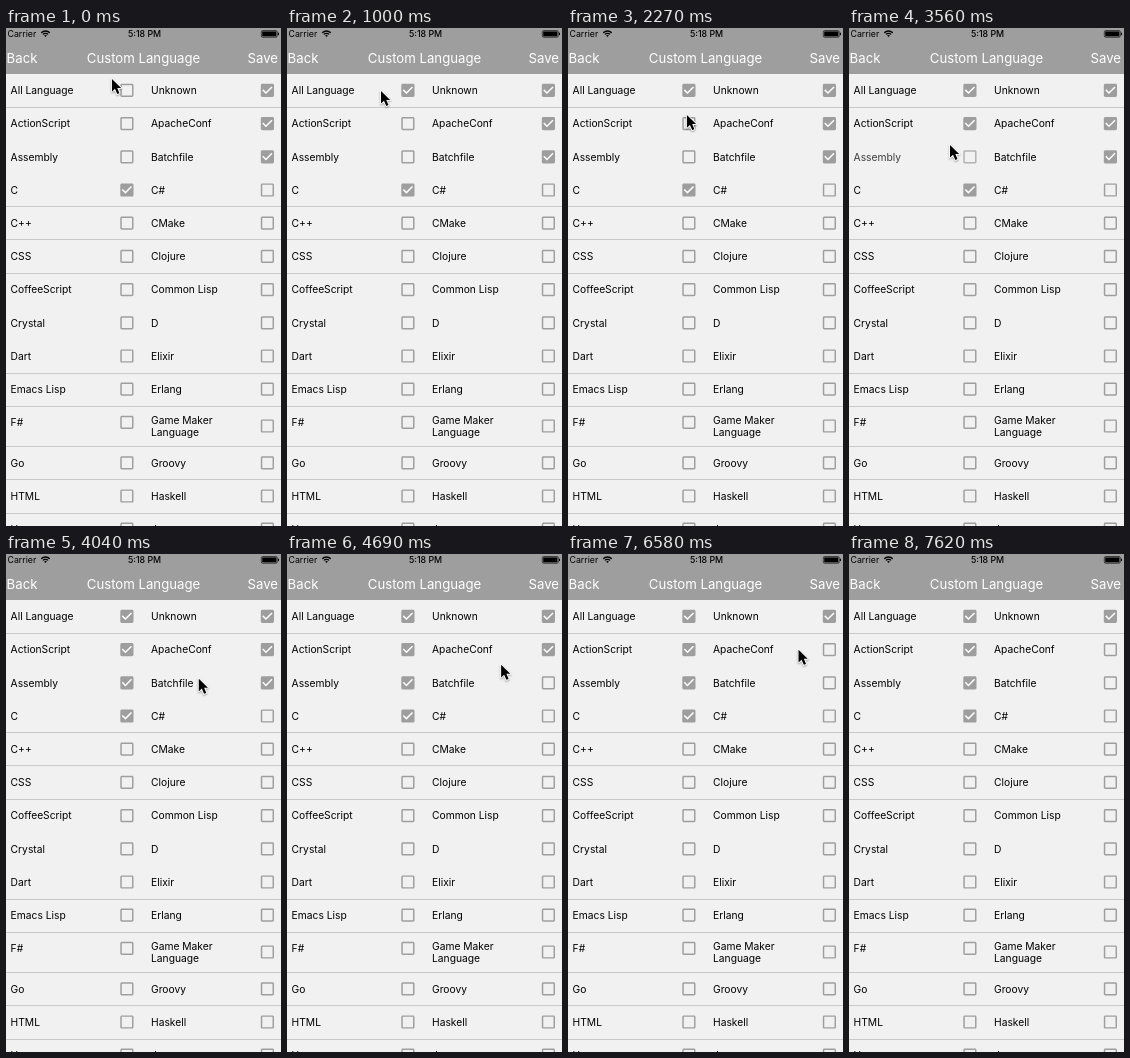
Recreate the animation shown at these times as an HTML page with a canvas. Size 275 by 498 pixels, loop 8000 ms.

```html
<!DOCTYPE html>
<html lang="en">
<head>
<meta charset="utf-8">
<title>Custom Language</title>
<style>
  html, body { margin: 0; width: 100%; height: 100%; overflow: hidden; background: #f1f1f1; }
  canvas { display: block; width: 275px; height: 498px; }
</style>
</head>
<body>
<canvas id="stage"></canvas>
<script>
const W = 275, H = 498, LOOP = 8000;
const GRAY = '#9e9e9e', PAPER = '#f1f1f1', RULE = '#c9c9c9';
const FONT = 'Inter, Roboto, sans-serif';
const ROW = 33.2, FIRST = 62.4, ICON = 17.6;

const canvas = document.getElementById('stage');
const ratio = window.devicePixelRatio || 1;
canvas.width = W * ratio;
canvas.height = H * ratio;
const ctx = canvas.getContext('2d');

const names = [
  ['All Language', 'Unknown'], ['ActionScript', 'ApacheConf'],
  ['Assembly', 'Batchfile'], ['C', 'C#'], ['C++', 'CMake'],
  ['CSS', 'Clojure'], ['CoffeeScript', 'Common Lisp'],
  ['Crystal', 'D'], ['Dart', 'Elixir'], ['Emacs Lisp', 'Erlang'],
  ['F#', 'Game Maker\nLanguage'], ['Go', 'Groovy'],
  ['HTML', 'Haskell'], ['Haxe', 'Java']
];
const rules = [79, 178, 211, 245, 345, 378, 418, 451, 485];
const checkedAtStart = ['Unknown', 'ApacheConf', 'Batchfile', 'C'];

// Each tap dims its cell, may pass a half-restored step, then settles.
const taps = {
  'All Language': { down: 910, done: 1000 },
  'ActionScript': { down: 2660, mid: 2700, done: 2740 },
  'Assembly': { down: 3560, mid: 3620, done: 3680 },
  'Batchfile': { down: 4400, done: 4490 },
  'ApacheConf': { down: 5130, mid: 5170, done: 5210 }
};

// Pointer keys: time, x, y, and 1 where it slows to a rest.
const path = [
  [0, 105, 49], [20, 104, 50], [170, 93, 61, 1],
  [1425, 93, 61], [1700, 181, 69], [1920, 199, 61, 1],
  [2035, 199, 61], [2270, 118, 85], [2390, 112, 91, 1],
  [2890, 112, 91], [3270, 100, 115, 1],
  [3835, 100, 115], [4160, 206, 124, 1],
  [4615, 206, 124], [4690, 213, 109], [4920, 228, 90, 1],
  [6555, 228, 90], [6580, 229.3, 92], [6730, 264, 372],
  [6975, 264, 373], [7140, 203, 441, 1],
  [7325, 203, 441], [7620, 190, 500]
];

const emptyBox = new Path2D('M19 5v14H5V5h14m0-2H5c-1.1 0-2 .9-2 2v14c0 1.1.9 2 2 2h14c1.1 0 2-.9 2-2V5c0-1.1-.9-2-2-2z');
const checkedBox = new Path2D('M19 3H5c-1.11 0-2 .9-2 2v14c0 1.1.89 2 2 2h14c1.11 0 2-.9 2-2V5c0-1.1-.89-2-2-2zm-9 14l-5-5 1.41-1.41L10 14.17l7.59-7.59L19 8l-9 9z');
const arrow = new Path2D('M1 2V14.6L4 11.8L6.3 17L8.5 16.1L6.3 10.9H10.2Z');

function text(str, x, y, size, color, align = 'left', weight = 400) {
  ctx.font = `${weight} ${size}px ${FONT}`;
  ctx.fillStyle = color;
  ctx.textAlign = align;
  ctx.fillText(str, x, y);
}

function checkbox(x, y, on) {
  ctx.save();
  ctx.translate(x - ICON / 2, y - ICON / 2);
  ctx.scale(ICON / 24, ICON / 24);
  if (on) {
    ctx.fillStyle = '#fff';
    ctx.fillRect(4, 5, 16, 13);
  }
  ctx.fillStyle = GRAY;
  ctx.fill(on ? checkedBox : emptyBox);
  ctx.restore();
}

function cellState(name, t) {
  const start = checkedAtStart.includes(name), tap = taps[name];
  if (!tap || t < tap.down) return { on: start, alpha: 1 };
  if (t >= tap.done) return { on: !start, alpha: 1 };
  if (tap.mid && t >= tap.mid) return { on: !start, alpha: 0.87 };
  return { on: start, alpha: 0.75 };
}

function drawCell(name, column, y, t) {
  const { on, alpha } = cellState(name, t);
  const left = column ? 145 : 4.6;
  const lines = name.split('\n');
  ctx.globalAlpha = alpha;
  lines.forEach((line, i) => {
    const shift = (i - (lines.length - 1) / 2) * 12.6;
    text(line, left, y + 3.8 + shift, 10.27, '#000');
  });
  checkbox(column ? 261.4 : 120.9, y, on);
  ctx.globalAlpha = 1;
}

function drawList(t) {
  ctx.fillStyle = RULE;
  rules.forEach(y => ctx.fillRect(0, y, W, 1));
  names.forEach((pair, row) => {
    const y = FIRST + row * ROW + (row > 10 ? 7.2 : 0);
    pair.forEach((name, column) => {
      drawCell(name, column, y + (name.includes('\n') ? 3.6 : 0), t);
    });
  });
}

function drawWifi(x, y) {
  ctx.strokeStyle = '#000';
  ctx.lineWidth = 1.3;
  for (const r of [3.7, 6]) {
    ctx.beginPath();
    ctx.arc(x, y, r, -Math.PI * 0.75, -Math.PI * 0.25);
    ctx.stroke();
  }
  ctx.fillStyle = '#000';
  ctx.beginPath();
  ctx.moveTo(x, y);
  ctx.arc(x, y, 2, -Math.PI * 0.75, -Math.PI * 0.25);
  ctx.fill();
}

function drawBattery() {
  ctx.strokeStyle = ctx.fillStyle = '#000';
  ctx.lineWidth = 0.6;
  ctx.beginPath();
  ctx.roundRect(255.3, 2.5, 16, 6.8, 1.4);
  ctx.stroke();
  ctx.fillRect(256.2, 3.4, 14.2, 5);
  ctx.fillRect(272, 4.7, 1, 2.4);
}

function drawHeader() {
  ctx.fillStyle = GRAY;
  ctx.fillRect(0, 0, W, 46);
  text('Carrier', 1.5, 9, 8.8, '#000');
  drawWifi(39.5, 9);
  text('5:18 PM', 138.5, 9, 8.8, '#000', 'center', 500);
  drawBattery();
  text('Back', 0.6, 35, 13.2, '#fff');
  text('Custom Language', 137.5, 35, 13.2, '#fff', 'center');
  text('Save', 272, 35, 13.2, '#fff', 'right');
}

function pointerAt(t) {
  const next = path.findIndex(key => key[0] > t);
  if (next < 0) return null;
  const [t0, x0, y0] = path[next - 1];
  const [t1, x1, y1, rest] = path[next];
  const u = (t - t0) / (t1 - t0);
  const e = rest ? 1 - (1 - u) ** 2 : u;
  return [x0 + (x1 - x0) * e, y0 + (y1 - y0) * e];
}

function drawPointer(t) {
  const at = pointerAt(t);
  if (!at) return;
  ctx.save();
  ctx.translate(...at);
  ctx.lineJoin = 'round';
  ctx.lineWidth = 1.8;
  ctx.strokeStyle = '#fff';
  ctx.shadowColor = 'rgba(0,0,0,0.35)';
  ctx.shadowBlur = 2 * ratio;
  ctx.shadowOffsetY = ratio;
  ctx.stroke(arrow);
  ctx.shadowColor = 'transparent';
  ctx.fillStyle = '#000';
  ctx.fill(arrow);
  ctx.restore();
}

function draw(t) {
  ctx.setTransform(ratio, 0, 0, ratio, 0, 0);
  ctx.fillStyle = PAPER;
  ctx.fillRect(0, 0, W, H);
  drawList(t);
  drawHeader();
  drawPointer(t);
}

const begin = performance.now();
function tick() {
  draw((performance.now() - begin) % LOOP);
  requestAnimationFrame(tick);
}
tick();
</script>
</body>
</html>
```
